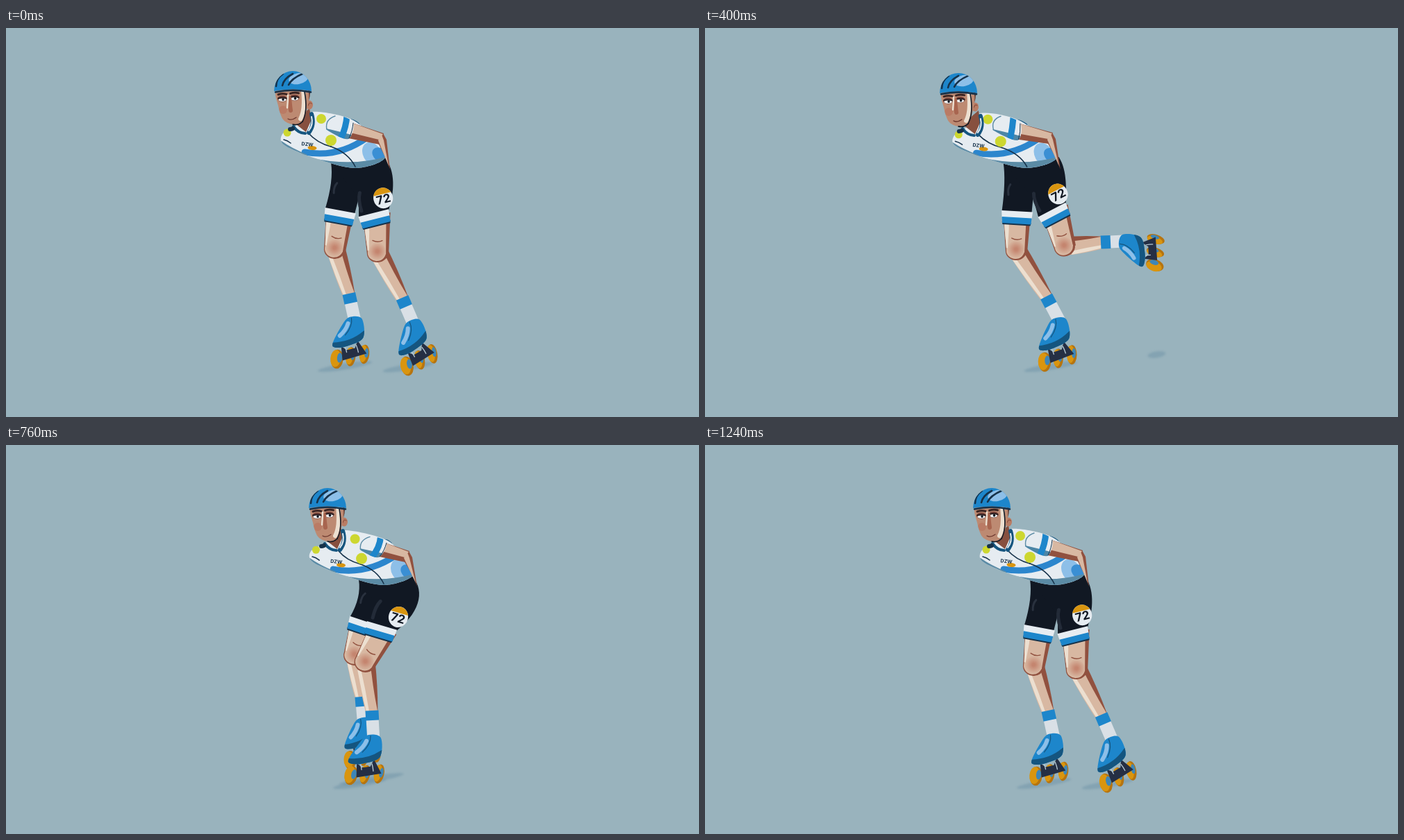
Write an HTML page with a canvas that moves like this. It is 998 by 561 pixels and loops after 1280 ms.

```html
<!DOCTYPE html>
<html lang="en">
<head>
<meta charset="utf-8">
<title>Inline skater</title>
<style>
html, body { margin: 0; width: 100%; height: 100%; overflow: hidden; background: #99b3bd; }
canvas { display: block; width: 100vw; height: 100vh; }
</style>
</head>
<body>
<canvas id="stage" width="998" height="561"></canvas>
<script>
const ctx = document.getElementById('stage').getContext('2d');
const LOOP = 1280, STEP = 40, CYCLE = 1240, RAD = Math.PI / 180;
const C = {
  bg: '#99b3bd', blue: '#1d86cb', deep: '#15557f', sky: '#8dbfe8', white: '#e6ecf1',
  black: '#111823', navy: '#16324a', skin: '#d8b8a2', cream: '#ecdfd0', brown: '#91513f',
  face: '#bd8a72', orange: '#d9950f', rust: '#b6740f', teal: '#5b8ba5', lime: '#cdd730'
};

// Six key poses: glide, kick, return, cross, step, push
const KEYS = [0, 240, 400, 600, 760, 1040];
const SWAY = [0, -1.01, -.96, .05, 1, .9];
const NEAR = {
  knee: [[536, 325], [524, 310], [519, 316], [498, 322], [517, 315], [537, 320]],
  ankle: [[571, 390], [580, 304], [571, 309], [537, 371], [527, 384], [557, 388]],
  rot: [-16, -84, -78, -17, 7, -1]
};
const FAR = {
  knee: [[474, 320], [450, 322], [449, 322], [455, 322], [502, 305], [526, 318]],
  ankle: [[494, 384], [497, 383], [492, 388], [477, 382], [512, 364], [566, 355]],
  rot: [0, -10, -5, 4, -5, -66]
};

// Smooth periodic curve through the keys
function track(v, t) {
  const n = KEYS.length, i = KEYS.findLastIndex(k => k <= t);
  const val = j => v[(j + n) % n];
  const key = j => KEYS[(j + n) % n] + CYCLE * Math.floor(j / n);
  const d = key(i + 1) - key(i), s = (t - key(i)) / d;
  const slope = j => (val(j + 1) - val(j - 1)) / (key(j + 1) - key(j - 1)) * d;
  const s2 = s * s, s3 = s2 * s;
  return (2 * s3 - 3 * s2 + 1) * val(i) + (s3 - 2 * s2 + s) * slope(i)
    + (3 * s2 - 2 * s3) * val(i + 1) + (s3 - s2) * slope(i + 1);
}
const joint = (v, t) => [0, 1].map(k => track(v.map(p => p[k]), t));

const clamp = (x, a, b) => Math.min(b, Math.max(a, x));
const mix = (a, b, k) => a + (b - a) * k;
const same = (x, y) => [x, y];

function place(x, y, a, draw) {
  ctx.save();
  ctx.translate(x, y);
  ctx.rotate(a);
  draw();
  ctx.restore();
}

function pairs(flat, map = same) {
  const out = [];
  for (let i = 0; i < flat.length; i += 2) out.push(map(flat[i], flat[i + 1]));
  return out;
}

function poly(fill, flat, map) {
  ctx.beginPath();
  pairs(flat, map).forEach(p => ctx.lineTo(...p));
  ctx.closePath();
  ctx.fillStyle = fill;
  ctx.fill();
}

// Fills a closed smooth shape; details drawn by inner stay inside it
function blob(fill, flat, map, inner) {
  const p = pairs(flat, map), n = p.length, k = .16;
  const at = i => p[(i + n) % n];
  ctx.save();
  ctx.beginPath();
  ctx.moveTo(...p[0]);
  for (let i = 0; i < n; i++) {
    const [a, b, c, d] = [at(i - 1), at(i), at(i + 1), at(i + 2)];
    ctx.bezierCurveTo(b[0] + (c[0] - a[0]) * k, b[1] + (c[1] - a[1]) * k,
      c[0] - (d[0] - b[0]) * k, c[1] - (d[1] - b[1]) * k, c[0], c[1]);
  }
  ctx.fillStyle = fill;
  ctx.fill();
  if (inner) {
    ctx.clip();
    inner();
  }
  ctx.restore();
}

// Quadratic stroke: start, control, end
function line(color, width, flat, map) {
  const [a, b, c] = pairs(flat, map);
  ctx.beginPath();
  ctx.moveTo(...a);
  ctx.quadraticCurveTo(...b, ...c);
  ctx.strokeStyle = color;
  ctx.lineWidth = width;
  ctx.lineCap = 'round';
  ctx.stroke();
}

function oval(fill, x, y, rx, ry = rx, a = 0) {
  ctx.beginPath();
  ctx.ellipse(x, y, rx, ry, a, 0, 7);
  ctx.fillStyle = fill;
  ctx.fill();
}

// Tapered band along y, from [left, right] at y0 to [left, right] at y1
function taper(fill, y0, [l0, r0], y1, [l1, r1], swell = 0) {
  const m = (y0 + y1) / 2;
  ctx.beginPath();
  ctx.moveTo(l0, y0);
  ctx.quadraticCurveTo((l0 + l1) / 2 - swell, m, l1, y1);
  ctx.lineTo(r1, y1);
  ctx.quadraticCurveTo((r0 + r1) / 2 + swell, m, r0, y0);
  ctx.fillStyle = fill;
  ctx.fill();
}

function label(text, size, color) {
  ctx.font = `bold ${size}px Inter, Roboto, sans-serif`;
  ctx.textAlign = 'center';
  ctx.textBaseline = 'middle';
  ctx.fillStyle = color;
  ctx.fillText(text, 0, 0);
}

// Joints and angles of one leg at time t
function pose(leg, hipX, tilt, t) {
  const knee = joint(leg.knee, t), ankle = joint(leg.ankle, t), rot = track(leg.rot, t) * RAD;
  const hip = [hipX, 205];
  const along = k => hip.map((h, i) => mix(h, knee[i], k));
  const thigh = Math.atan2(hipX - knee[0], knee[1] - hip[1]);
  const shin = Math.atan2(knee[0] - ankle[0], ankle[1] - knee[1]);
  const shinLen = Math.hypot(ankle[0] - knee[0], ankle[1] - knee[1]);
  const sock = shin + 5 * RAD, sockLen = Math.min(36, shinLen * .52);
  const heel = [ankle[0] - Math.sin(sock) * sockLen, ankle[1] + Math.cos(sock) * sockLen];
  const foot = [heel[0] - Math.sin(rot) * 40, heel[1] + Math.cos(rot) * 40];
  return { knee, ankle, rot, along, thigh, shin, shinLen, sock, sockLen, heel, foot,
    hemRot: thigh + tilt * RAD };
}

// Wide and faint just off the ground, small when the foot is high
function shadow({ foot: [x, y] }) {
  const lift = clamp((465 - y) / 140, 0, 1);
  const rx = 13 + 34 * Math.exp(-(((lift - .2) / .3) ** 2));
  ctx.filter = 'blur(1.5px)';
  oval('rgba(98,138,160,.38)', x + mix(-20, 13, Math.min(1, lift * 4)),
    490 - 19 * Math.min(1, lift * 2), rx, 4.5, -.16);
  ctx.filter = 'none';
}

function skate() {
  for (let i = 2; i >= 0; i--) {
    const x = 20 * i - 26, y = 60 - 3.5 * i, r = i ? 7 : 9;
    oval(C.rust, x + 1, y, r, 14, .1);
    oval(C.orange, x - 1, y - 1, r - 1.5, 12.5, .1);
    oval('#3d86b8', x + r * .55, y - 2, r * .42, 7, .1);
  }
  poly('#252f44', [-19, 41, -11, 47, 1, 44, 5, 33, 18, 52, -17, 62]);
  for (const x of [-14, 3]) line('#b9cbd6', 1.3, [x, 40, x + 2, 45, x + 3, 50]);
  blob(C.blue, [-7, -1, 11, 1, 13, 29, -10, 41, -28, 43, -31, 36, -18, 11], same, () => {
    line(C.deep, 12, [-34, 42, -4, 42, 17, 24]);
    line(C.sky, 6, [-9, 8, -12, 18, -21, 26]);
    line(C.deep, 1.2, [-4, 0, -2, 12, -13, 25]);
  });
}

function limb(p) {
  const n = p.shinLen;
  place(...p.knee, p.shin, () => {
    taper(C.skin, 0, [-12, 14], n + 2, [-9, 8], 2);
    taper(C.brown, -4, [8, 15], n, [8, 8.5], 2);
    taper(C.cream, 8, [-12, -7], n, [-8, -4], 1);
  });
  place(...p.knee, p.thigh, () => {
    taper(C.brown, -58, [-19, 21], 2, [-16, 15]);
    oval(C.brown, -1, 0, 15, 13);
    taper(C.skin, -58, [-19, 15], 2, [-14.5, 11]);
    oval(C.skin, -2, -1, 13, 12);
    taper(C.cream, -58, [-18, -10], -5, [-15, -13], 1);
    const glow = ctx.createRadialGradient(-1, -3, 2, -1, -3, 13);
    glow.addColorStop(0, 'rgba(190,116,94,.75)');
    glow.addColorStop(1, 'rgba(190,116,94,0)');
    oval(glow, -1, -3, 12, 13);
    line(C.brown, 1.4, [-7, -19, 0, -15, 7, -18]);
  });
  place(...p.ankle, p.sock, () => {
    taper('#d9e0e6', 12, [-9, 9], p.sockLen + 4, [-9, 9]);
    taper(C.blue, -1, [-9.5, 9.5], 13, [-9.5, 9.5]);
  });
  place(...p.heel, p.rot, () => {
    const size = .7 + .3 * p.sockLen / 36;
    ctx.scale(size, size);
    skate();
  });
}

function shorts(p, u, near) {
  const c = Math.cos(p.hemRot), s = Math.sin(p.hemRot), [hx, hy] = p.along(.66);
  const hem = (x, y) => [hx + x * c - y * s, hy + x * s + y * c];
  const left = 468 + 40 * u, right = 545 + 37 * u;
  ctx.beginPath();
  ctx.moveTo(left, 194);
  if (near) {
    ctx.lineTo(right, 186);
    ctx.bezierCurveTo(right + 17 + 4 * u, 206, right + 14 + 4 * u, 238, ...hem(22.5, -17));
  } else {
    ctx.quadraticCurveTo(left + 4, 220, ...hem(-22, -17));
  }
  ctx.lineTo(...hem(near ? -22 : 21, -17));
  ctx.lineTo(508 + 37 * u, 245);
  if (!near) ctx.lineTo(right, 186);
  ctx.fillStyle = C.black;
  ctx.fill();
  place(hx, hy, p.hemRot, () => {
    taper(C.navy, -2, [-21, 21], 2, [-20, 20]);
    taper(C.white, -18, [-22.5, 22.5], -8, [-21.5, 21.5]);
    taper(C.blue, -9, [-21.5, 21.5], 0, [-20.5, 20.8]);
    if (near) line('#232b38', 5, [-12, -51, -17, -42, -16, -25]);
    else line('#29313e', 3, [-12, -56, -16, -50, -14, -41]);
  });
  if (!near) return;
  const [bx, by] = p.along(.36);
  place(bx + 12 * c, by + 12 * s, p.hemRot, () => {
    oval(C.white, 0, 0, 14, 15);
    ctx.beginPath();
    ctx.ellipse(0, 0, 14, 15, 0, Math.PI + .4, -.4);
    ctx.fillStyle = C.orange;
    ctx.fill();
    ctx.translate(0, 2.5);
    label('72', 17, C.black);
  });
}

function torso(w) {
  line(C.deep, 6, [494, 134, 500, 134, 506, 139], w);
  blob(C.white, [417, 141, 398, 153, 401, 169, 446, 188, 503, 202, 546, 187, 527, 157, 496, 131, 440, 121], w, () => {
    oval(C.sky, ...w(527, 181), 13, 17, -.5);
    oval('#3a8fd4', ...w(541, 184), 15, 10, .6);
    line('#2c86cd', 9, [430, 179, 478, 188, 520, 158], w);
    line(C.teal, 15, [440, 195, 500, 208, 552, 192], w);
    line(C.teal, 4, [396, 165, 410, 175, 432, 184], w);
  });
  line(C.navy, 1.6, [435, 151, 448, 166, 468, 171], w);
  line(C.navy, 1.6, [468, 171, 493, 180, 503, 200], w);
  line(C.navy, 1.6, [400, 161, 405, 162, 410, 166], w);
  oval(C.lime, ...w(405, 151), 5.5);
  oval(C.lime, ...w(454, 131), 7);
  oval(C.lime, ...w(468, 162), 8);
  oval(C.orange, ...w(441, 173), 6.5, 3, .08);
  place(...w(434, 168), .1, () => label('DZW', 7, C.navy));
}

function arm(w, u) {
  const ex = 544 + 41 * u - 4 * u * u, ey = 152 + u;
  const hx = 553 + 41 * u - 2 * u * u, hy = 204;
  const top = w(496, 136), low = w(493, 159);
  poly(C.brown, [...top, ex, ey, ex - 6, ey + 16, ...low]);
  poly(C.brown, [ex - 1, ey, ex + 4, ey + 9, hx, hy, hx - 5, hy - 14, ex - 8, ey + 14]);
  poly(C.skin, [...top, ex - 1, ey + 1, ex - 7, ey + 9, low[0] + 3, low[1] - 8]);
  poly(C.skin, [ex - 3, ey + 2, ex, ey + 10, hx - 2, hy - 5, ex - 8, ey + 10]);
  blob(C.white, [461, 142, 476, 127, 500, 136, 493, 160, 467, 150], w, () => {
    line('#4c86a6', 10, [460, 150, 478, 154, 500, 160], w);
    line(C.blue, 9, [491, 126, 490, 143, 482, 160], w);
  });
  line(C.teal, 1.4, [462, 146, 459, 132, 474, 127], w);
  line(C.navy, 1, [500, 137, 499, 149, 494, 159], w);
}

function collar() {
  poly('#87503f', [414, 136, 437, 116, 440, 132, 432, 150]);
  line(C.deep, 4, [414, 142, 421, 152, 431, 152]);
  line(C.deep, 6, [440, 124, 445, 140, 436, 151]);
  line(C.white, 2, [440, 128, 443, 139, 436, 148]);
  line(C.navy, 6, [409, 146, 411, 146, 413, 145]);
}

function eye(x, y) {
  oval('#733f36', x, y - 1, 7, 4.5);
  oval('#eef0f0', x, y + .5, 5.6, 2.6);
  oval(C.black, x + 1, y, 1.7, 2);
  line('#2a2023', 2, [x - 6, y - 1.5, x, y - 3.5, x + 6, y - 1.5]);
  line('#3b2523', 3, [x - 6, y - 7, x, y - 9, x + 6, y - 7.5]);
}

function head() {
  line('#5b2f25', 8, [434, 92, 434, 98, 432, 104]);
  oval('#b97d65', 437, 111, 5, 6.5);
  line(C.brown, 1.2, [435, 112, 437, 106, 440, 109]);
  blob(C.face, [391, 88, 392, 112, 400, 133, 417, 139, 430, 130, 434, 88], same, () => {
    line(C.cream, 6, [428, 90, 431, 118, 424, 131]);
    oval('rgba(183,110,88,.5)', 399, 118, 6);
    eye(398, 103);
    eye(415.5, 101.5);
    line('#a8654f', 6, [408, 101, 409, 112, 410, 119]);
    line(C.cream, 2.4, [406, 97, 406, 106, 405, 115]);
    line('#6d382e', 1.3, [406, 131, 411, 134, 418, 129]);
  });
  line(C.black, 1.6, [430, 92, 435, 120, 427, 135]);
  line(C.black, 1.6, [427, 135, 421, 141, 413, 139]);

  ctx.save();
  ctx.beginPath();
  ctx.ellipse(413, 91, 27, 29, 0, Math.PI, 0);
  ctx.quadraticCurveTo(413, 86, 386, 91);
  ctx.fillStyle = C.blue;
  ctx.fill();
  ctx.clip();
  oval(C.sky, 421, 73, 14, 8, -.2);
  for (let i = 0; i < 3; i++) {
    line(C.navy, 2.6, [389 + 9 * i, 84 - i, 389 + 11 * i, 73, 399 + 14 * i, 66]);
  }
  ctx.restore();
  line(C.navy, 2.6, [388, 92.5, 413, 87, 439, 92.5]);
}

function draw(t) {
  const u = track(SWAY, t), bob = 3 * Math.max(0, -u);
  // The shoulder swings further than the rest of the trunk
  const trunk = (x, y) => {
    const k = Math.exp(-(((x - 475) / 42) ** 2) - ((y - 135) / 25) ** 2);
    return [x + u * (41 + 10 * k),
      y + k * 6 * Math.max(0, u) + bob * clamp((195 - y) / 40, 0, 1) * (1 - k)];
  };
  const far = pose(FAR, 487 + 41 * u, 4, t), near = pose(NEAR, 529 + 45 * u, -11, t);
  ctx.fillStyle = C.bg;
  ctx.fillRect(0, 0, 998, 561);
  shadow(far);
  shadow(near);
  limb(far);
  shorts(far, u, false);
  limb(near);
  shorts(near, u, true);
  torso(trunk);
  arm(trunk, u);
  place(45 * u, bob, 0, collar);
  place(50 * u, bob, 0, head);
}

function frame() {
  draw(Math.floor(performance.now() % LOOP / STEP) * STEP % CYCLE);
  requestAnimationFrame(frame);
}
frame();
</script>
</body>
</html>
```
